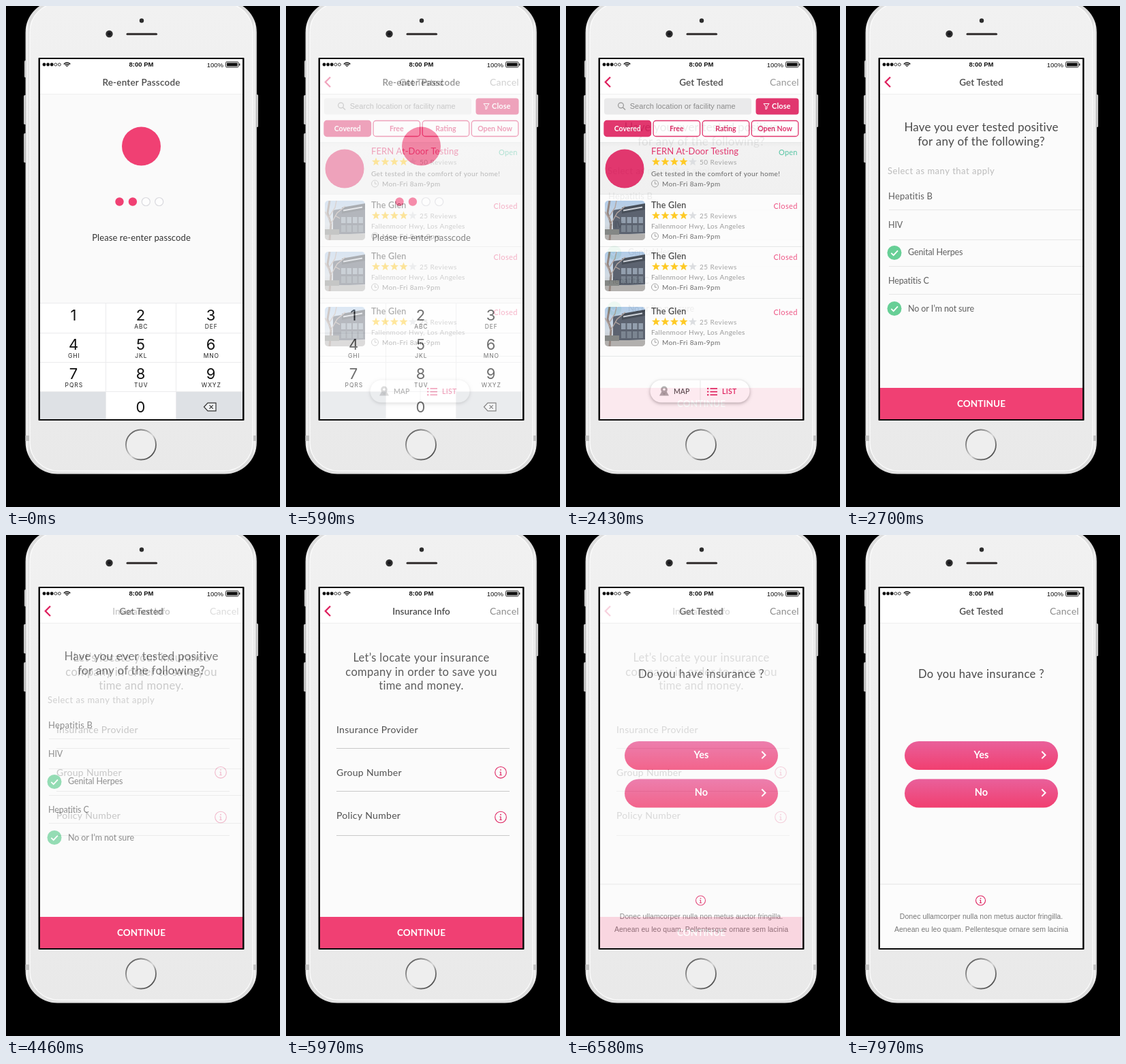
An HTML page with a canvas for the animation above (8 s loop, 402 by 736 pixels).

```html
<!DOCTYPE html>
<html lang="en">
<head>
<meta charset="utf-8">
<title>Passcode and testing flow</title>
<style>
html, body { margin: 0; width: 100%; height: 100%; overflow: hidden; background: #000; }
canvas { display: block; width: 402px; height: 736px; }
</style>
</head>
<body>
<canvas id="stage"></canvas>
<script>
const W = 402, H = 736, LOOP = 8000, STEP = 30, STEPS = 10, MID = 198.5;
const PINK = '#f04073', ROSE = '#de205e', GREEN = '#67cf96', INK = '#4a4a4a', GREY = '#8c8c8c';
const LATO = 'Lato, sans-serif', ARIAL = '"Liberation Sans", Arial, sans-serif', INTER = 'Inter, sans-serif';
const dpr = window.devicePixelRatio || 1;
let g;

function layer(draw, canvas = document.createElement('canvas')) {
  canvas.width = W * dpr;
  canvas.height = H * dpr;
  g = canvas.getContext('2d');
  g.scale(dpr, dpr);
  if (draw) draw();
  return canvas;
}

function text(str, x, y, size, { color = INK, weight = 400, font = LATO, align = 'left', gap = 0 } = {}) {
  g.font = `${weight} ${size}px ${font}`;
  g.letterSpacing = gap + 'px';
  g.textAlign = align;
  g.fillStyle = color;
  g.fillText(str, x, y);
}

const centered = (str, y, size, opts) => text(str, MID, y, size, { align: 'center', ...opts });

function rect(x, y, w, h, fill) {
  g.fillStyle = fill;
  g.fillRect(x, y, w, h);
}

function paint(fill, stroke, width = 1) {
  if (fill) { g.fillStyle = fill; g.fill(); }
  if (stroke) { g.strokeStyle = stroke; g.lineWidth = width; g.stroke(); }
}

function round(x, y, w, h, r, fill, stroke, width) {
  g.beginPath();
  g.roundRect(x, y, w, h, r);
  paint(fill, stroke, width);
}

function circle(x, y, r, fill, stroke, width) {
  g.beginPath();
  g.arc(x, y, r, 0, 7);
  paint(fill, stroke, width);
}

function path(points, color, width, fill) {
  g.beginPath();
  points.forEach(([x, y]) => g.lineTo(x, y));
  if (fill) g.closePath();
  paint(fill, color, width);
}

function ramp(x0, y0, x1, y1, ...stops) {
  const grad = g.createLinearGradient(x0, y0, x1, y1);
  stops.forEach(([at, color]) => grad.addColorStop(at, color));
  return grad;
}

// Device

function phone() {
  rect(0, 0, W, H, '#000');
  const metal = ramp(0, 0, 0, 240, [0, '#ddd'], [1, '#bbb']);
  [[27, 80, 25], [26, 131, 43], [26, 187, 43]].forEach(([x, y, h]) => round(x, y, 5, h, 1.5, metal));
  round(365, 130, 5, 48, 1.5, metal);
  const rim = ramp(28, 0, 368, 0, [0, '#b5b5b5'], [0.008, '#f6f6f6'], [0.018, '#dcdcdc'],
    [0.5, '#f4f4f4'], [0.982, '#dcdcdc'], [0.992, '#f6f6f6'], [1, '#b0b0b0']);
  round(28.5, -8, 339.5, 695.5, 47, rim);
  rect(28.5, 631, 6, 8, '#c2c2c2');
  rect(362, 631, 6, 8, '#c2c2c2');
  round(35, -4, 327, 687, 42, ramp(0, 0, 0, 688, [0, '#f1f1f1'], [0.5, '#ededed'], [1, '#e9e9e9']), '#fafafa', 1.5);

  circle(199, 21.5, 3.2, '#2c2c2c');
  circle(151.5, 41, 5.2, '#303030');
  circle(151.5, 41, 2.4, '#15151a');
  round(176.5, 39.7, 45.5, 3, 1.5, '#2f2b2b');
  const ring = ramp(180, 626, 216, 662, [0, '#555'], [0.3, '#9a9a9a'], [0.55, '#d8d8d8'], [0.75, '#777'], [1, '#444']);
  circle(198, 644.5, 22, '#eeeeee', ring, 1.8);

  round(47.5, 76, 302, 533, 1, '#0b0b0b');
  rect(50, 78, 297, 529, '#fff');
  statusBar();
}

function statusBar() {
  for (let i = 0; i < 5; i++) circle(56 + i * 5.6, 86, i < 3 ? 2.4 : 2, i < 3 && '#111', '#111', i < 3 ? 0.1 : 0.8);
  [2, 4.4, 6.8].forEach(r => {
    g.beginPath();
    g.arc(89.5, 89.5, r - 0.6, -Math.PI * 0.77, -Math.PI * 0.23);
    paint(null, '#111', 1.5);
  });
  centered('8:00 PM', 89.3, 9.5, { weight: 700, font: ARIAL, color: '#111' });
  text('100%', 294.7, 89.5, 9.5, { font: ARIAL, color: '#111' });
  round(322.5, 82, 18.5, 8, 1.5, null, '#111', 0.9);
  rect(324, 83.5, 15.5, 5, '#111');
  rect(342, 84.5, 1.3, 3, '#111');
}

// Shared screen parts

function base(title, { back, cancel, gap = 0, body = '#fbfbfb' } = {}) {
  rect(50, 93, 297, 514, body);
  rect(50, 93, 297, 36, '#fff');
  rect(50, 129, 297, 1, '#efefef');
  centered(title, 116.5, 13.5, { weight: 600, gap });
  if (back) path([[65, 104.5], [57.8, 111.7], [65, 119]], ROSE, 2.3);
  if (cancel) text('Cancel', 299, 116.5, 14, { color: GREY, gap: 0.25 });
}

function continueBar() {
  rect(50, 561, 297, 46, PINK);
  centered('CONTINUE', 588.5, 13.5, { color: '#fff', weight: 700, gap: 0.1 });
}

function info(x, y, r) {
  circle(x, y, r, null, ROSE, 1.1);
  circle(x, y - r * 0.45, 0.9, ROSE);
  rect(x - 0.6, y - r * 0.12, 1.2, r * 0.6, ROSE);
  rect(x - 1.6, y - r * 0.12, 1.6, 0.8, ROSE);
  rect(x - 1.8, y + r * 0.42, 3.6, 0.9, ROSE);
}

// Passcode

function passcode() {
  base('Re-enter Passcode', { gap: 0.2, body: '#fafafa' });
  circle(198.5, 206, 28.5, PINK);
  for (let i = 0; i < 4; i++) {
    const x = 166.5 + i * 19.4;
    i < 2 ? circle(x, 287.5, 6.2, PINK) : circle(x, 287.5, 6, '#fdfdfd', '#d9d9de', 1.2);
  }
  centered('Please re-enter passcode', 344.5, 13, { color: '#333', gap: 0.1 });

  rect(50, 436, 297, 171, '#fff');
  rect(50, 567, 96, 40, '#dee1e5');
  rect(250, 567, 97, 40, '#dee1e5');
  [436, 480, 523, 566].forEach(y => rect(50, y, 297, 1, '#ebebed'));
  [146, 249].forEach(x => rect(x, 436, 1, 171, '#ebebed'));
  const cols = [99, 197.5, 300.5];
  const key = (str, x, y) => text(str, x, y, 22, { font: INTER, color: '#111', align: 'center' });
  ['', 'ABC', 'DEF', 'GHI', 'JKL', 'MNO', 'PQRS', 'TUV', 'WXYZ'].forEach((letters, i) => {
    const x = cols[i % 3], y = 462 + 43 * Math.floor(i / 3);
    key(String(i + 1), x, y);
    text(letters, x + 0.8, y + 12, 8.5, { font: INTER, color: '#222', align: 'center', gap: 0.9 });
  });
  key('0', 197.5, 597);
  path([[290.5, 589], [296, 583.2], [308, 583.2], [308, 594.8], [296, 594.8]], '#333', 1.2, '#eef0f2');
  path([[298.5, 586.4], [303.7, 591.6]], '#333', 1.2);
  path([[303.7, 586.4], [298.5, 591.6]], '#333', 1.2);
}

// Facility list

function star(x, y, fill) {
  const points = Array.from({ length: 10 }, (_, i) => {
    const r = i % 2 ? 2.7 : 6.4, a = i * Math.PI / 5;
    return [x + r * Math.sin(a), y - r * Math.cos(a)];
  });
  path(points, null, 0, fill);
}

function rating(y, reviews) {
  for (let i = 0; i < 5; i++) star(132 + i * 13.5, y, i < 4 ? '#ffc50d' : '#d9dbde');
  text(reviews + ' Reviews', 196, y + 3.5, 10, { color: '#9b9b9b', gap: 0.45 });
}

function hours(y) {
  circle(130.5, y, 5, null, '#999', 1);
  path([[130.5, y - 3.2], [130.5, y + 0.3], [133.3, y + 0.3]], '#999', 1);
  text('Mon-Fri 8am-9pm', 141, y + 4, 10, { color: '#5d5d5d', gap: 0.35 });
}

function photo(x, y) {
  g.save();
  round(x, y, 59, 58, 5);
  g.clip();
  g.translate(x, y);
  rect(0, 0, 59, 58, ramp(0, 0, 0, 58, [0, '#a9c6e6'], [0.6, '#ccd6e0'], [1, '#b9b8b6']));
  path([[12, 14], [59, 6], [59, 48], [12, 50]], null, 0, '#4a5260');
  path([[25, 10], [59, 4], [59, 13], [25, 19]], null, 0, '#343b47');
  path([[27, 14.5], [55, 9.5]], '#c9ced6', 2);
  for (let i = 0; i < 4; i++) rect(24 + i * 8.5, 24, 6.5, 9, '#8795a5');
  for (let i = 0; i < 4; i++) rect(24 + i * 8.5, 36, 6.5, 10, '#6c7885');
  rect(0, 49, 59, 9, '#aaa8a6');
  path([[7, 58], [9, 34], [4, 18], [7, 0]], '#8b7a73', 3);
  [[[9, 34], [18, 18], [30, 8]], [[6, 24], [15, 10], [17, 0]], [[8, 30], [0, 16]], [[15, 22], [22, 26]]]
    .forEach(branch => path(branch, '#ab9b96', 1.4));
  rect(0, 42, 21, 8, '#777a78');
  g.restore();
}

function facility(dy) {
  photo(57, 286 + dy);
  text('The Glen', 125, 297.3 + dy, 12.5, { color: '#3a3a3a', weight: 600, gap: 0.2 });
  text('Closed', 304.5, 298 + dy, 11, { color: '#ec4277', gap: 0.4 });
  rating(308 + dy, 25);
  text('Fallenmoor Hwy, Los Angeles', 125, 327 + dy, 10, { color: '#8f8f8f', gap: 0.35 });
  hours(338 + dy);
}

function search() {
  round(56, 135.5, 216, 24, 4, '#e9e9ea');
  circle(80.5, 146, 3.9, null, '#8a8a8a', 1.2);
  path([[83.4, 149], [87, 152.5]], '#8a8a8a', 1.2);
  text('Search location or facility name', 93.7, 151.3, 11, { font: ARIAL, color: '#7d7d7d', gap: 0.07 });
  round(278.5, 135.5, 63, 24, 4, ROSE);
  path([[290, 143.5], [298, 143.5], [295, 147.5], [295, 150.5], [293, 152], [293, 147.5], [290, 143.5]], '#fff', 1);
  text('Close', 302, 151.3, 11, { color: '#fff', weight: 700, gap: 0.1 });
  ['Covered', 'Free', 'Rating', 'Open Now'].forEach((label, i) => {
    const x = 56 + i * 72.1;
    round(x, 168.5, 68.5, 23, 4, i ? '#fff' : ROSE, ROSE, 1.3);
    text(label, x + 34.2, 183.5, 10.5, { color: i ? ROSE : '#fff', weight: 700, align: 'center' });
  });
}

function tabs() {
  g.save();
  g.shadowColor = 'rgba(0,0,0,.32)';
  g.shadowBlur = 5 * dpr;
  g.shadowOffsetY = 1.5 * dpr;
  round(123.5, 549.5, 146, 33, 16.5, '#fff');
  g.restore();
  rect(196.5, 550, 1, 32, '#e8e8e8');
  path([[137, 572.5], [140, 567], [148, 567], [151, 572.5]], null, 0, '#aaa');
  path([[139.4, 565], [148.6, 565], [144, 572]], null, 0, '#999');
  circle(144, 563.3, 4.8, '#aaa');
  circle(144, 563.3, 1.8, '#fff');
  text('MAP', 158, 570, 10.5, { color: '#444', weight: 500 });
  for (let i = 0; i < 3; i++) {
    circle(208.2, 562 + i * 4.6, 1.2, ROSE);
    rect(211.5, 561.2 + i * 4.6, 10.5, 1.7, ROSE);
  }
  text('LIST', 229, 570, 10.5, { color: ROSE, weight: 600, gap: 0.3 });
}

function facilities() {
  base('Get Tested', { back: true, cancel: true, body: '#fdfdfd' });
  search();
  rect(50, 200, 297, 76, ramp(0, 200, 0, 276, [0, '#ececec'], [0.1, '#f1f1f1'], [1, '#efefef']));
  [200, 276, 353, 429, 514].forEach(y => rect(50, y, 297, 1, '#e3e5e5'));
  circle(86, 239, 28.5, ROSE);
  text('FERN At-Door Testing', 125, 217.7, 13, { color: ROSE, gap: 0.05 });
  text('Open', 312, 218.5, 11, { color: '#45bf9b', gap: 0.2 });
  rating(229, 50);
  text('Get tested in the comfort of your home!', 125, 250, 10, { color: '#555', gap: 0.36 });
  hours(261);
  [0, 75, 156].forEach(facility);
  tabs();
}

// Questions

function check(y) {
  circle(71, y, 10.5, GREEN);
  path([[66.3, y + 0.3], [69.7, y + 3.6], [76, y - 3.2]], '#fff', 1.8);
}

function history() {
  base('Get Tested', { back: true });
  centered('Have you ever tested positive', 184, 17, { gap: 0.17 });
  centered('for any of the following?', 204.8, 17, { gap: 0.2 });
  text('Select as many that apply', 61, 247, 13, { color: '#bcbcbc', gap: 0.5 });
  text('Hepatitis B', 62, 284.3, 13, { color: '#606060', gap: 0.18 });
  const row = (str, x, y) => text(str, x, y, 12.5, { color: '#606060', gap: -0.12 });
  row('HIV', 62, 326);
  row('Genital Herpes', 91, 366.3);
  row('Hepatitis C', 62, 408.3);
  row('No or I’m not sure', 91, 448.6);
  check(362.5);
  check(444.5);
  [299, 343, 382, 423].forEach(y => rect(63, y, 284, 1, '#e6e6e6'));
  continueBar();
}

function details() {
  base('Insurance Info', { back: true, cancel: true });
  ['Let’s locate your insurance', 'company in order to save you', 'time and money.']
    .forEach((line, i) => centered(line, 185.8 + i * 20.8, 16.5, { color: '#5c5c5c', gap: 0.33 }));
  [['Insurance Provider', 290.5, 313], ['Group Number', 354, 376], ['Policy Number', 417, 441]]
    .forEach(([label, y, line]) => {
      text(label, 74, y, 14, { color: '#505050', gap: 0.3 });
      rect(74, line, 254, 1, '#c9c9c9');
    });
  info(315, 348.8, 8.3);
  info(315, 414.5, 8.3);
  continueBar();
}

function choice(label, y) {
  round(86, y, 225, 42, 21, ramp(0, y, 0, y + 42, [0, '#e9609b'], [1, '#f13f70']));
  centered(label, y + 24.6, 14.5, { color: '#fff', weight: 700 });
  path([[287.3, y + 15], [292.5, y + 20.2], [287.3, y + 25.4]], '#fff', 2);
}

function insurance() {
  base('Get Tested', { cancel: true });
  centered('Do you have insurance ?', 210.3, 16.5, { gap: 0.37 });
  choice('Yes', 303);
  choice('No', 358.5);
  rect(50, 513, 297, 94, '#fcfcfc');
  rect(50, 512.5, 297, 1, '#e6e6e6');
  info(197.5, 537, 7);
  const note = { font: ARIAL, color: '#777', gap: 0.06 };
  centered('Donec ullamcorper nulla non metus auctor fringilla.', 564.3, 10.5, note);
  centered('Aenean eu leo quam. Pellentesque ornare sem lacinia', 583.3, 10.5, note);
}

// Playback

const device = layer(phone);
const scenes = [[-300, passcode], [500, facilities], [2430, history], [4400, details], [6370, insurance]]
  .map(([start, draw]) => ({ start, image: layer(draw) }));
const stage = document.getElementById('stage');
layer(null, stage);
const out = stage.getContext('2d');

function show(image, alpha = 1) {
  out.globalAlpha = alpha;
  out.drawImage(image, 0, 0, W, H);
}

function render(t) {
  const i = scenes.findLastIndex(scene => t >= scene.start);
  const mix = Math.min(1, (Math.floor((t - scenes[i].start) / STEP) + 1) / STEPS);
  show(device);
  if (mix < 1) show(scenes[i - 1].image);
  show(scenes[i].image, mix);
}

const begin = performance.now();
function tick() {
  render((performance.now() - begin) % LOOP);
  requestAnimationFrame(tick);
}
tick();
</script>
</body>
</html>
```
